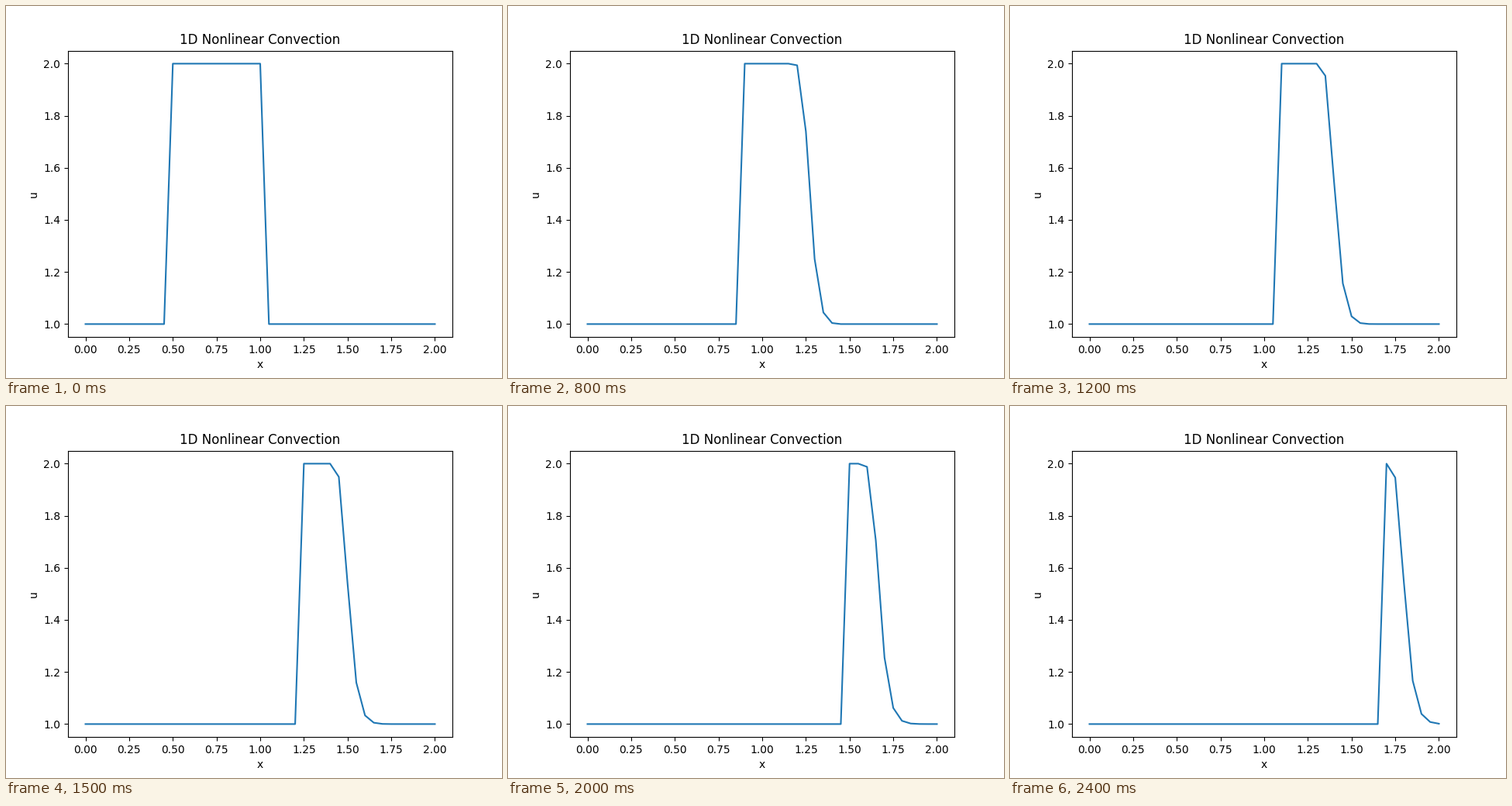
A matplotlib script that plays this animation: 640 px wide and 480 px high, repeating every 2.5 s.

```python
import numpy as np
import matplotlib.pyplot as plt
from matplotlib.animation import FuncAnimation

NX = 41
STEPS = 25
DX = 2 / (NX - 1)
DT = 0.025


def solve():
    """Upwind solution of u_t + u u_x = 0 for a square pulse, one row per step."""
    u = np.ones((STEPS, NX))
    u[0, int(0.5 / DX):int(1 / DX + 1)] = 2
    for n in range(STEPS - 1):
        un = u[n]
        u[n + 1, 1:] = un[1:] - un[1:] * DT / DX * (un[1:] - un[:-1])
    return u


x = np.linspace(0, 2, NX)
history = solve()

fig, ax = plt.subplots(figsize=(6.4, 4.8), dpi=100)
line, = ax.plot(x, history[0])
ax.set(xlabel="x", ylabel="u", title="1D Nonlinear Convection",
       xlim=(-0.1, 2.1), ylim=(0.95, 2.05))


def update(n):
    line.set_ydata(history[n])
    return line,


anim = FuncAnimation(fig, update, frames=STEPS, interval=100, repeat=True)
plt.show()
```
